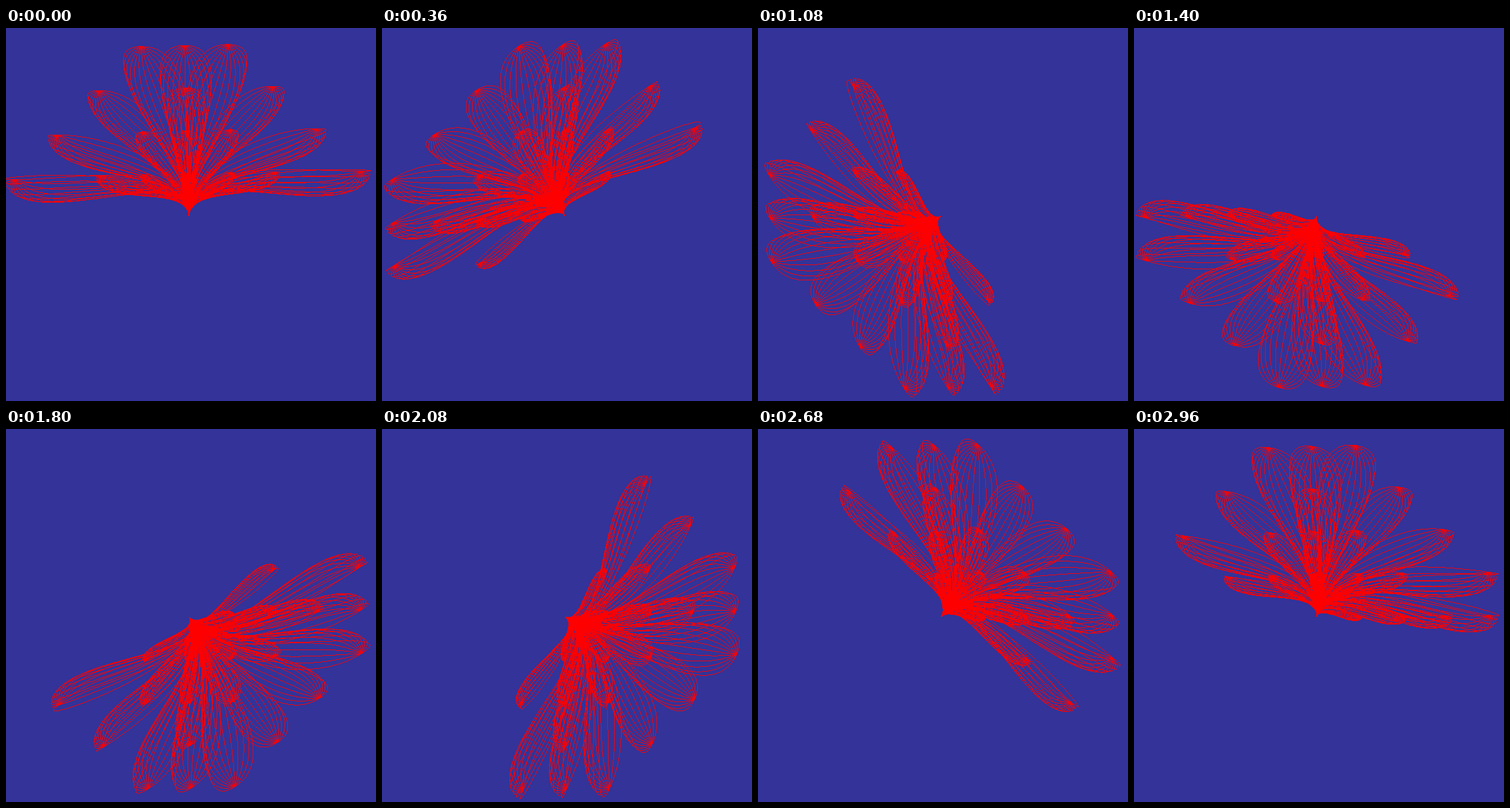
Write an HTML page that moves like this. It is 534x538 px and loops after 3 s.

```html
<!DOCTYPE html>
<html lang="en">
<head>
<meta charset="utf-8">
<title>Heading fan</title>
<style>
  html, body { margin: 0; width: 100%; height: 100%; overflow: hidden; background: #339; }
  svg { display: block; width: 100%; height: 100%; }
  path { fill: none; stroke: #f00; stroke-width: .85; shape-rendering: crispEdges; }
</style>
</head>
<body>
<svg viewBox="0 0 534 538"><path id="fan"/></svg>
<script>
const LOOP = 3000, STEPS = 44;
const CX = 264, CY = 271, CELL = 62.5;
const RAD = Math.PI / 180;
const TILT = 1.4 * RAD, PULL = 0.016;
const fan = document.getElementById('fan');

// Goal cells of one quadrant, turned into all four.
const quadrant = [[1, 0], [2, 0], [3, 0], [4, 0], [1, 1], [2, 1], [1, 2],
                  [4, 1], [3, 2], [2, 3], [1, 4]];
const goals = quadrant.flatMap(([x, y]) => [[x, y], [-y, x], [-x, -y], [y, -x]]);

const unit = deg => [Math.cos(deg * RAD), Math.sin(deg * RAD)];
const point = (x, y) => (CX + x).toFixed(2) + ' ' + (CY - y).toFixed(2);

// Hermite curves from the centre to one goal, one for each end heading.
function petal([i, j], heading) {
  const len = Math.hypot(i, j) * CELL, third = len / 3;
  const [ux, uy] = unit(heading);
  const c = Math.cos(TILT), s = Math.sin(TILT);
  const x = (i * c - j * s) * CELL - ux * len * PULL;
  const y = (i * s + j * c) * CELL - uy * len * PULL;
  const start = 'M' + point(0, 0) + 'C' + point(ux * third, uy * third) + ' ';
  let d = '';
  for (let a = -90; a <= 90; a += 15) {
    const [ex, ey] = unit(heading + a);
    d += start + point(x - ex * third, y - ey * third) + ' ' + point(x, y);
  }
  return d;
}

// Only goals ahead of the nearest 15 degree heading are reached.
function draw(step) {
  const heading = 90 + step * 360 / STEPS;
  const [sx, sy] = unit(Math.round(heading / 15) * 15);
  const limit = Math.cos(88 * RAD);
  fan.setAttribute('d', goals
    .filter(([i, j]) => i * sx + j * sy > limit * Math.hypot(i, j))
    .map(goal => petal(goal, heading)).join(''));
}

// 15 steps a second on a 40 ms clock, with one short hold early on.
function stepAt(ms) {
  const k = Math.floor(Math.floor(ms / 40) * 3 / 5);
  return k < 4 ? k : k - 1;
}

let shown = -1, origin = null;
function tick(now) {
  if (origin === null) origin = now;
  const step = stepAt((now - origin) % LOOP);
  if (step !== shown) draw(shown = step);
  requestAnimationFrame(tick);
}
draw(shown = 0);
requestAnimationFrame(tick);
</script>
</body>
</html>
```
